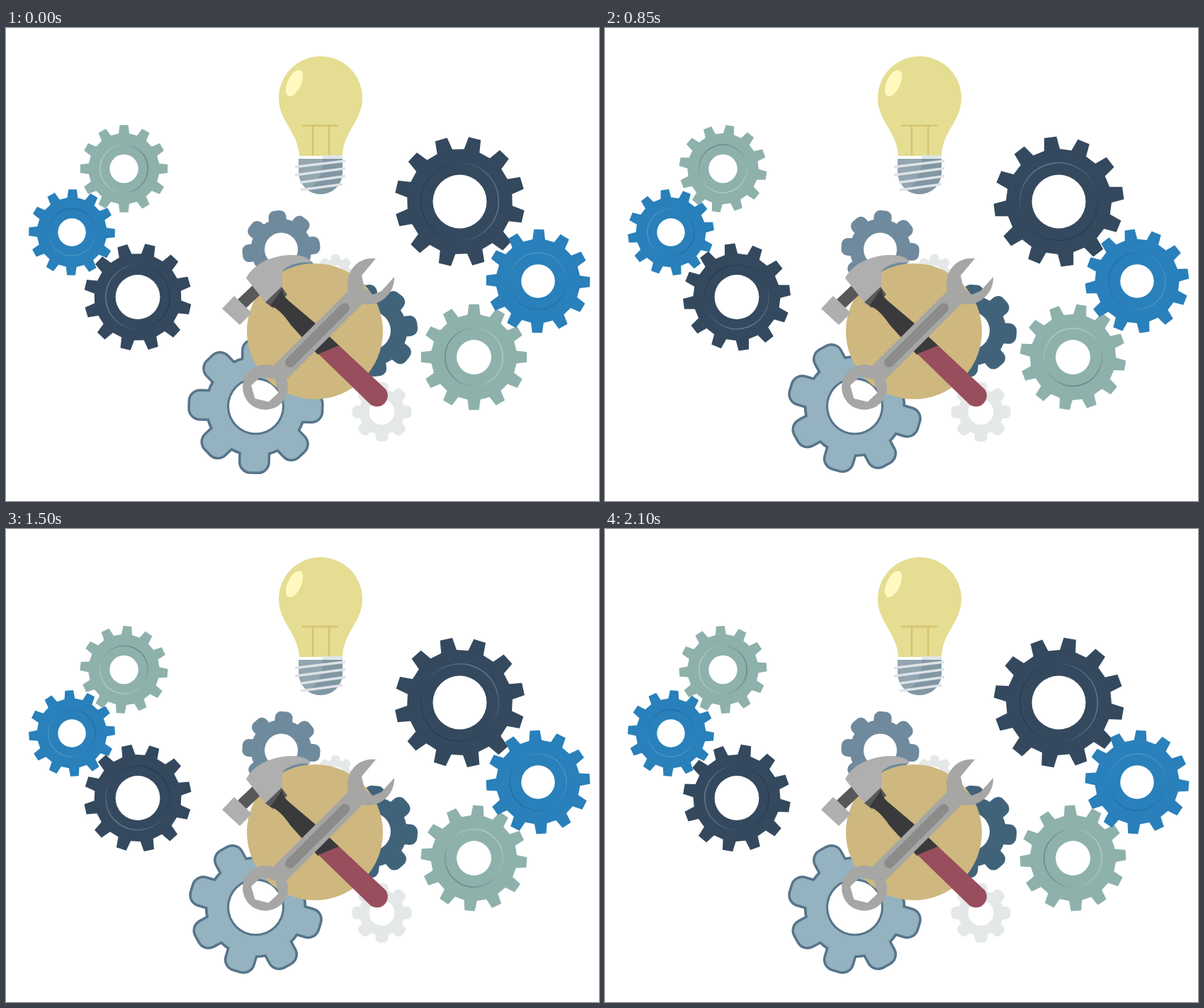
Write an HTML page with a canvas that moves like this. It is 837 by 669 pixels and loops after 2150 ms.

```html
<!DOCTYPE html>
<html lang="en">
<head>
<meta charset="utf-8">
<title>Gears and tools</title>
<style>
html, body { margin: 0; width: 100%; height: 100%; overflow: hidden; background: #fff; }
canvas { display: block; }
</style>
</head>
<body>
<canvas id="c" width="837" height="669"></canvas>
<script>
const ctx = document.getElementById('c').getContext('2d');
const TAU = Math.PI * 2, RAD = Math.PI / 180;
const LOOP = 2150, TICK = 50;
// The outer gears make half a turn in 52 poses of 40 ms
const POSES = 52, POSE_MS = 40;

const TEAL = { fill: '#8eb1ac', light: '#b2cbc6', dark: '#6c8585', phase: 0, dir: 1, hole: .326, ring: .545 };
const BLUE = { fill: '#2980ba', light: '#4b95c5', dark: '#226fa4', phase: 1, dir: -1, hole: .323, ring: .545 };
const NAVY = { fill: '#34495e', light: '#64768a', dark: '#293a50', phase: -16.7, dir: 1, hole: .413, ring: .595 };

// x, y, outer radius, kind, direction of the ring highlight at rest
const gears = [
  [166.5, 199, 62, TEAL, -90],
  [186, 380.5, 76, NAVY, -90],
  [93, 289, 61, BLUE, 180],
  [640.5, 245.5, 92, NAVY, 90],
  [660.5, 465.5, 75, TEAL, 90],
  [751, 358, 73.5, BLUE, 0]
];

function disc(x, y, r, fill) {
  ctx.beginPath();
  ctx.arc(x, y, r, 0, TAU);
  ctx.fillStyle = fill;
  ctx.fill();
}

function shape(d, fill) {
  ctx.fillStyle = fill;
  ctx.fill(new Path2D(d));
}

function line(x1, y1, x2, y2, width, color, cap) {
  ctx.beginPath();
  ctx.moveTo(x1, y1);
  ctx.lineTo(x2, y2);
  ctx.lineWidth = width;
  ctx.strokeStyle = color;
  ctx.lineCap = cap || 'butt';
  ctx.stroke();
}

function sharpGear([x, y, r, kind, lit], turn) {
  const root = r * .81;
  ctx.save();
  ctx.translate(x, y);
  ctx.rotate((kind.phase + kind.dir * turn) * RAD);
  ctx.beginPath();
  for (let i = 0; i < 12; i++) {
    const a = (i * 30 - 90) * RAD;
    for (const [q, off] of [[root, -8.6], [r, -5.5], [r, 5.5], [root, 8.6]])
      ctx.lineTo(q * Math.cos(a + off * RAD), q * Math.sin(a + off * RAD));
  }
  ctx.closePath();
  ctx.fillStyle = kind.fill;
  ctx.fill();
  ctx.restore();

  ctx.save();
  ctx.translate(x, y);
  ctx.rotate((lit + kind.dir * turn) * RAD);
  const rr = r * kind.ring;
  const g = ctx.createLinearGradient(0, -rr, 0, rr);
  g.addColorStop(0, kind.light);
  g.addColorStop(.5, kind.fill);
  g.addColorStop(1, kind.dark);
  ctx.beginPath();
  ctx.arc(0, 0, rr, 0, TAU);
  ctx.lineWidth = 1.5;
  ctx.strokeStyle = g;
  ctx.stroke();
  ctx.restore();
  disc(x, y, r * kind.hole, '#fff');
}

function roundGear(x, y, r, root, hole, w, turn, fill, edge) {
  const p = new Path2D();
  p.arc(0, 0, root, 0, TAU);
  for (let i = 0; i < 8; i++) {
    const tooth = new Path2D();
    tooth.roundRect(-w / 2, -r, w, r - root * .7, w * .36);
    p.addPath(tooth, new DOMMatrix().rotate(i * 45));
  }
  ctx.save();
  ctx.translate(x, y);
  ctx.rotate(turn * RAD);
  if (edge) {
    ctx.strokeStyle = edge;
    ctx.lineWidth = 7;
    ctx.lineJoin = 'round';
    ctx.stroke(p);
  }
  ctx.fillStyle = fill;
  ctx.fill(p);
  ctx.restore();
  if (edge) disc(x, y, hole + 3, edge);
  disc(x, y, hole, '#fff');
}

function bulb() {
  shape('M385 99A59 59 0 0 1 503 99C503 132 476 146 475 181H414C412 146 385 132 385 99Z', '#e5dd92');
  ctx.beginPath();
  ctx.ellipse(407, 78, 9.5, 20, 25 * RAD, 0, TAU);
  ctx.fillStyle = '#fff9c0';
  ctx.fill();
  line(418, 138, 469, 138, 2.5, '#d6c36f');
  line(433, 138, 433, 180, 2.5, '#d6c36f');
  line(456, 138, 456, 180, 2.5, '#d6c36f');
  shape('M447 180H475V186H447Z', '#dfe5e8');
  shape('M413 185H475V204A31 31 0 0 1 413 204Z', '#92a5b0');
  shape('M447 185H475V204A31 31 0 0 1 425 228.5C440 222 447 206 447 185Z', '#8197a3');
  line(408, 196.5, 479, 188, 3.5, '#dce3e7');
  line(408, 208, 479, 198.5, 3.5, '#dce3e7');
  line(415, 218.5, 479, 209.5, 3.5, '#dce3e7');
  line(416, 229, 475, 221, 3.5, '#dce3e7');
}

function hammer() {
  shape('M348 364L359 377L339 396L327 384Z', '#58585a');
  shape('M322 379L347 403L330 420L305 397Z', '#afafaf');
  shape('M339 354C347 337 370 322 402 321C418 321 428 325 430 332C414 330 397 335 390 344V365L367 389Z', '#afafaf');
  shape('M366 388L389 366L397 377L377 396Z', '#58585a');
  shape('M390 369C391 380 397 384 404 390L437 418L471 450L440 462L402 420C391 404 383 396 373 393Z', '#3a3a3c');
  shape('M441 461L470 449L536 511A15.5 15.5 0 0 1 515 533Z', '#984e5c');
}

function wrench() {
  const gray = '#a6a6a4';
  line(386, 488, 494, 380, 27, gray);
  line(401, 473, 478, 396, 14, '#8b8b8a', 'round');
  shape('M522 326C499 323 481 341 482 364L484 378L500 389C521 397 549 380 548 352L530 372L518 377L506 368L502 350Z', gray);
  // ring with an open hexagon
  ctx.beginPath();
  ctx.arc(366, 508, 32, 0, TAU);
  ctx.closePath();
  for (let i = 0; i < 6; i++) {
    const a = (15 + i * 60) * RAD;
    const px = 365.5 + 20 * Math.cos(a), py = 510.5 + 19 * Math.sin(a);
    i ? ctx.lineTo(px, py) : ctx.moveTo(px, py);
  }
  ctx.closePath();
  ctx.fillStyle = gray;
  ctx.fill('evenodd');
}

function draw(ms) {
  // the first tick shows the closing pose
  const n = Math.floor((ms % LOOP) / TICK) || LOOP / TICK;
  const pose = Math.floor((n - 1) * TICK / POSE_MS);
  const turn = (pose - POSES) * 180 / POSES;
  const tilted = Math.floor((n - 1) / 3) % 2 === 1;
  const small = tilted ? 4.5 : -7;

  ctx.fillStyle = '#fff';
  ctx.fillRect(0, 0, 837, 669);
  gears.forEach(g => sharpGear(g, turn));
  bulb();

  roundGear(465, 347, 27, 21, 11, 12, 0, '#e5e8e8');
  roundGear(388.5, 313, 55, 43, 23.5, 25, small, '#6f8a9c');
  roundGear(516, 428, 65, 50, 27, 29, small, '#41637a');
  roundGear(530.5, 543, 42, 32, 18, 18, 0, '#e5e8e8');
  roundGear(352.5, 535, 92.5, 68, 37.5, 38, tilted ? 16.5 : 1.5, '#94b2bf', '#56748a');
  disc(436, 429, 96, '#ceb87f');
  hammer();
  wrench();
}

const start = performance.now();
function tick() {
  draw(performance.now() - start);
  requestAnimationFrame(tick);
}
tick();
</script>
</body>
</html>
```
